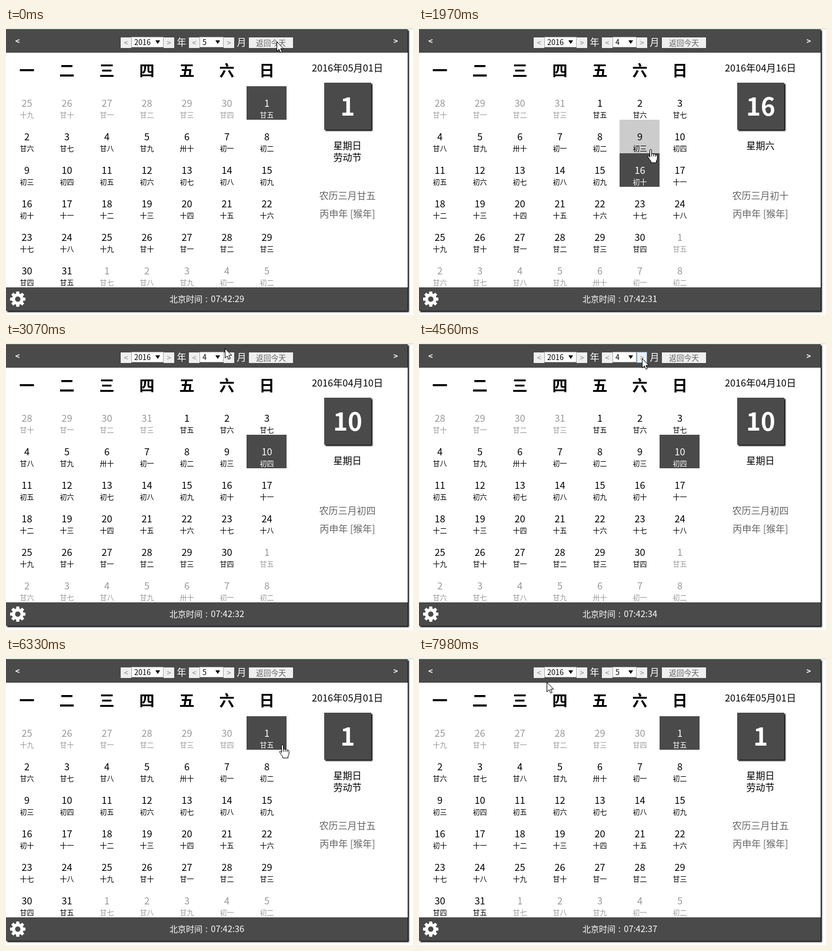
Recreate the animation shown at these times as an HTML page with a canvas. Size 692 by 488 pixels, loop 8 s.

```html
<!DOCTYPE html>
<html lang="zh">
<head>
<meta charset="utf-8">
<title>万年历</title>
<style>
  html, body { margin: 0; width: 100%; height: 100%; overflow: hidden; background: #fff; }
  canvas { display: block; width: 692px; height: 488px; }
</style>
</head>
<body>
<canvas id="stage" width="692" height="488"></canvas>
<script>
const LOOP = 8000;
const DARK = '#4a4a4a', GREY = '#999';
const FONT = '"Noto Sans CJK SC", "Noto Sans CJK", "Open Sans", sans-serif';
const WEEK = '一二三四五六日';
const DIGITS = '一二三四五六七八九十';
const CELL = { x: 1, y: 99, w: 68, h: 57 };
const ctx = document.getElementById('stage').getContext('2d');

// first: cell of day 1, lead: number in the first cell, lunar: its lunar day, skips: cells where the lunar count jumps
const MONTHS = {
  4: { first: 4, days: 30, lead: 28, lunar: 20, skips: [4] },
  5: { first: 6, days: 31, lead: 25, lunar: 19, skips: [37, 40] }
};

// Each state lasts until the next one starts.
const STATES = [
  { at: 0, month: 5, selected: 6, shown: [5, 6], focus: null },
  { at: 230, focus: 'today' },
  { at: 290, month: 4, selected: 17, shown: [4, 17] },
  { at: 1480, focus: null },
  { at: 1600, selected: 19, shown: [4, 19] },
  { at: 2380, selected: 13, shown: [4, 13] },
  { at: 4560, focus: 'next' },
  { at: 4690, month: 5, selected: -1 },
  { at: 5290, focus: null },
  { at: 5420, selected: 6, shown: [5, 6] }
];

// The pointer rests between moves; via bends the way.
const HOME = [460, 23];
const MOVES = [
  { from: 720, until: 1110, to: [493, 163], via: [551, 90] },
  { from: 1110, until: 1320, to: [392, 215] },
  { from: 1940, until: 2120, to: [443, 180], via: [395, 190] },
  { from: 2710, until: 3070, to: [372, 9], via: [405, 120] },
  { from: 3250, until: 3450, to: [378, 15] },
  { from: 4050, until: 4330, to: [379, 26] },
  { from: 4860, until: 5130, to: [429, 127], via: [418, 60] },
  { from: 6180, until: 6880, to: [618, 223] },
  { from: 6880, until: 7390, to: [551, 219] },
  { from: 7650, until: 7980, to: [217, 41] }
];

function pointerAt(t) {
  let pos = HOME;
  for (const { from, until, to, via } of MOVES) {
    if (t < from) break;
    const k = Math.min(1, (t - from) / (until - from));
    pos = pos.map((p, i) => {
      const bend = via ? via[i] : (p + to[i]) / 2;
      return (1 - k) ** 2 * p + 2 * k * (1 - k) * bend + k * k * to[i];
    });
  }
  const [x, y] = pos.map(Math.round);
  return { x, y };
}

function stateAt(t) {
  return Object.assign({}, ...STATES.filter(s => s.at <= t));
}

function lunarName({ lunar, skips }, cell) {
  const day = lunar + cell + skips.filter(s => s <= cell).length;
  const n = (day - 1) % 30 + 1;
  const prefix = n <= 10 ? '初' : n < 20 ? '十' : n < 30 ? '甘' : '卅';
  return prefix + DIGITS[(n - 1) % 10];
}

function rect(x, y, w, h, color) {
  ctx.fillStyle = color;
  ctx.fillRect(x, y, w, h);
}

function text(str, x, y, size, color, align = 'center', weight = 400) {
  ctx.font = `${weight} ${size}px ${FONT}`;
  ctx.fillStyle = color;
  ctx.textAlign = align;
  ctx.fillText(str, x, y);
}

function shadowed(x, y, w, h, color) {
  ctx.save();
  ctx.shadowColor = '#000';
  ctx.shadowBlur = ctx.shadowOffsetX = ctx.shadowOffsetY = 2;
  rect(x, y, w, h, color);
  ctx.restore();
}

function button(x, w, label, color, focused) {
  rect(x, 16, w, 18, '#efefef');
  text(label, x + w / 2, 30, 12.8, color);
  if (focused) {
    ctx.strokeStyle = '#5b9dd9';
    ctx.lineWidth = 1;
    ctx.strokeRect(x + .5, 15.5, w - 1, 18);
  }
}

function select(x, w, value) {
  rect(x, 15, w, 18, '#a9a9a9');
  rect(x + 1, 16, w - 2, 16, '#fff');
  text(value, x + 5, 29, 12.6, '#000', 'left');
  ctx.fillStyle = '#000';
  ctx.fill(new Path2D(`M${x + w - 14} 21h8l-4 6z`));
}

function stepper(x, w, value, unit, focused) {
  button(x, 18, '<', '#888');
  select(x + 18, w, value);
  button(x + 18 + w, 18, '>', '#888', focused);
  text(unit, x + w + 48.5, 30, 16, '#fff');
}

function drawHeader({ month, focus }) {
  rect(0, 2, 683, 40, DARK);
  text('<', 19.5, 27, 13, '#fff', 'center', 700);
  text('>', 662.5, 27, 13, '#fff', 'center', 700);
  stepper(195, 55, '2016', '年');
  stepper(311, 41, String(month), '月', focus === 'next');
  button(413, 75, '返回今天', '#666', focus === 'today');
}

function drawGrid({ month, selected }, hover) {
  const info = MONTHS[month], { first, days, lead } = info;
  [...WEEK].forEach((name, i) => text(name, 35.5 + i * CELL.w, 82, 26, '#000', 'center', 700));
  for (let i = 0; i < 42; i++) {
    const x = CELL.x + i % 7 * CELL.w, y = CELL.y + Math.floor(i / 7) * CELL.h;
    const inside = i >= first && i < first + days;
    const day = i < first ? lead + i : (i - first) % days + 1;
    const chosen = i === selected;
    const color = chosen ? '#fff' : inside ? '#000' : GREY;
    if (chosen || i === hover) rect(x, y, CELL.w, CELL.h, chosen ? DARK : '#ccc');
    text(day, x + 34.5, y + 35, 16.4, color);
    text(lunarName(info, i), x + 34.5, y + 54, 12, color);
  }
}

function drawPanel([month, cell]) {
  const info = MONTHS[month], day = cell - info.first + 1, x = 580.5;
  text(`2016年0${month}月${String(day).padStart(2, '0')}日`, x, 74, 16.3, '#000');
  shadowed(541, 93, 80, 80, DARK);
  text(day, x + .5, 149, 42, '#fff', 'center', 700);
  text('星期' + WEEK[cell % 7], x, 206, 16, '#000');
  if (month === 5 && day === 1) text('劳动节', x, 226, 16, '#000');
  text('农历三月' + lunarName(info, cell), x, 291, 16, '#666');
  text('丙申年 [猴年]', x, 322, 16, '#666');
}

function drawGear(cx, cy) {
  ctx.save();
  ctx.translate(cx, cy);
  ctx.fillStyle = '#fff';
  ctx.beginPath();
  for (let i = 0; i < 8; i++) {
    const a = i * Math.PI / 4;
    [[-.29, 9.8], [-.19, 13.3], [.19, 13.3], [.29, 9.8]].forEach(([d, r]) =>
      ctx.lineTo(r * Math.cos(a + d), r * Math.sin(a + d)));
  }
  ctx.closePath();
  ctx.moveTo(4.6, 0);
  ctx.arc(0, 0, 4.6, 0, Math.PI * 2);
  ctx.fill('evenodd');
  ctx.restore();
}

function drawFooter(t) {
  rect(0, 441, 683, 40, DARK);
  drawGear(20, 461);
  const seconds = 29 + Math.floor((t + 395) / 945);
  text('北京时间', 278, 466, 14, '#fff', 'left');
  text(':', 341, 466, 14, '#fff');
  text('07:42:' + seconds, 405, 466, 14.6, '#fff', 'right');
}

const ARROW = new Path2D('M.5 .5V16.5L4.2 13L6.8 18.7L9.3 17.6L6.8 12H11.8Z');
const HAND = new Path2D('M-1.5 13V1.2Q-1.5 -.5 0 -.5T1.5 1.2V7.2Q3 5.8 4.7 7.6' +
  'Q6.6 6.6 7.9 8.6Q11.2 7.8 11.2 11V15Q11 17.5 9.5 19V22H.5V19.5' +
  'Q-1.5 17.5 -4.6 12.5Q-5.2 10.2 -3.4 10.3Q-2.3 11 -1.5 13Z');
const KNUCKLES = new Path2D('M1.5 7V11.5M4.7 8V11.5M7.9 9V12');

function drawPointer({ x, y }, hand) {
  const shape = hand ? HAND : ARROW;
  ctx.save();
  ctx.translate(x, y);
  ctx.fillStyle = '#fff';
  ctx.strokeStyle = '#000';
  ctx.lineWidth = 1;
  ctx.fill(shape);
  ctx.stroke(shape);
  if (hand) ctx.stroke(KNUCKLES);
  ctx.restore();
}

function cellUnder({ x, y }) {
  const col = Math.floor((x - CELL.x) / CELL.w), row = Math.floor((y - CELL.y) / CELL.h);
  return col >= 0 && col < 7 && row >= 0 && row < 6 ? row * 7 + col : -1;
}

function draw(t) {
  const state = stateAt(t), pointer = pointerAt(t), hover = cellUnder(pointer);
  rect(0, 0, 692, 488, '#fff');
  rect(0, 1, 692, 1, '#b9d3b9');
  shadowed(0, 2, 683, 479, '#fff');
  drawGrid(state, hover);
  drawPanel(state.shown);
  drawHeader(state);
  drawFooter(t);
  drawPointer(pointer, hover >= 0);
}

const start = performance.now();
function tick() {
  draw((performance.now() - start) % LOOP);
  requestAnimationFrame(tick);
}
tick();
</script>
</body>
</html>
```
